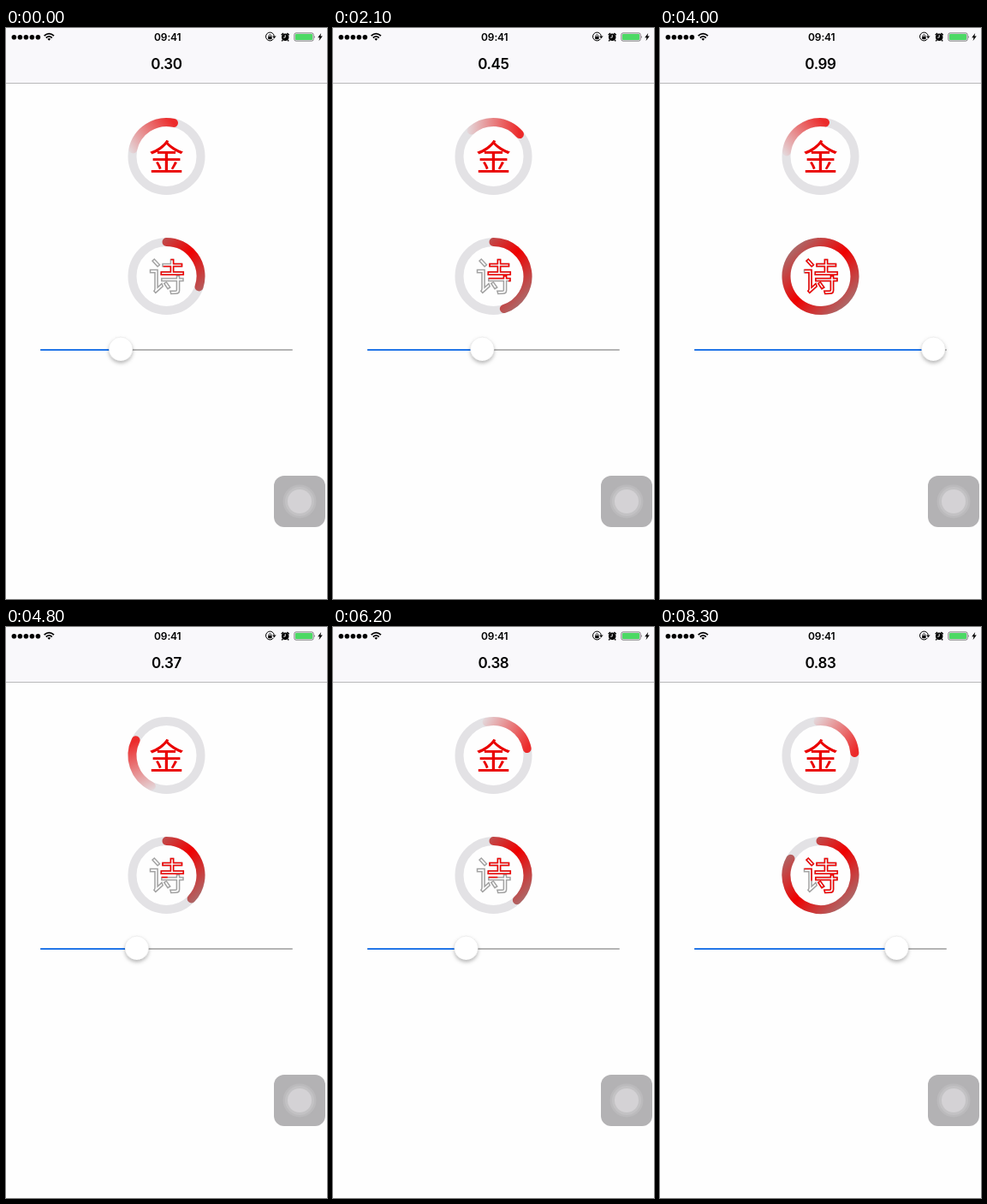
Write an HTML page that moves like this. It is 375 px wide and 667 px high and loops after 8400 ms.

```html
<!DOCTYPE html>
<html lang="zh">
<head>
<meta charset="utf-8">
<title>Progress rings</title>
<style>
  html, body { margin: 0; width: 100%; height: 100%; overflow: hidden; background: #fefefe; }
  svg { display: block; width: 375px; height: 667px; }
  .ui { font-family: Inter, Roboto, sans-serif; font-weight: 600; text-anchor: middle; }
  .glyph path { stroke-width: 1.5; stroke-linejoin: miter; }
</style>
</head>
<body>
<svg viewBox="0 0 375 667" fill="none">
  <defs>
    <linearGradient id="tail" gradientUnits="userSpaceOnUse" x1="146" y1="157" x2="187" y2="110">
      <stop offset="0" stop-color="#ec2a2a" stop-opacity="0.03"/>
      <stop offset="1" stop-color="#ec2a2a"/>
    </linearGradient>
    <linearGradient id="sheen" gradientUnits="userSpaceOnUse" x1="142.5" y1="245" x2="232.5" y2="335">
      <stop offset="0" stop-color="#929292"/>
      <stop offset=".5" stop-color="#f00000"/>
      <stop offset="1" stop-color="#929292"/>
    </linearGradient>
    <filter id="shade" x="-50%" y="-50%" width="200%" height="200%">
      <feDropShadow dx="0" dy="2.5" stdDeviation="2" flood-color="#000" flood-opacity=".28"/>
    </filter>
  </defs>

  <rect width="375" height="667" fill="#fefefe"/>
  <rect width="375" height="64" fill="#f9f8fb"/>
  <path d="M0 64.5H375" stroke="#b9b8ba"/>

  <!-- status bar -->
  <g id="dots" fill="#000"></g>
  <g stroke="#000" stroke-width="1.7">
    <path d="M44.6 9.2Q50.3 3.9 56 9.2M46.8 11.5Q50.3 8.3 53.8 11.5"/>
    <path d="M50.3 14.8L48.4 12.7Q50.3 11.2 52.2 12.7Z" fill="#000" stroke="none"/>
  </g>
  <text class="ui" x="188.8" y="14.8" font-size="12" letter-spacing="-.1" fill="#000">09:41</text>
  <g stroke="#000">
    <path d="M312.6 12.6A4.9 4.9 0 1 1 313.3 9.4"/>
    <path d="M311 9.4H315.6L313.3 12.2Z" fill="#000" stroke="none"/>
    <rect x="306.2" y="9.9" width="4.4" height="3.3" fill="#000" stroke="none"/>
    <path d="M307.1 10V9A1.3 1.3 0 0 1 309.7 9V10" stroke-width=".8"/>
  </g>
  <circle cx="326.2" cy="10.8" r="4.3" fill="#000"/>
  <path d="M321.7 8.2L324 6M330.7 8.2L328.4 6M323.3 14L322.2 15.4M329.1 14L330.2 15.4" stroke="#000" stroke-width="1.4"/>
  <path d="M326.2 8V11L324.2 11.2" stroke="#fff" stroke-width=".9"/>
  <rect x="336.9" y="5.9" width="22.2" height="9.2" rx="1.8" stroke="#555" stroke-width=".8"/>
  <rect x="338" y="7" width="20" height="7" rx=".8" fill="#4cd964"/>
  <path d="M360.1 8.8Q361.6 10.5 360.1 12.2Z" fill="#555"/>
  <path d="M368.2 6L364.2 11.2H366.5L365.6 15L369.8 9.6H367.4Z" fill="#000"/>

  <text id="title" class="ui" x="187.4" y="48.3" font-size="17" letter-spacing="-.4" fill="#000"></text>

  <!-- spinning ring -->
  <circle cx="187.5" cy="150" r="40" stroke="#e3e2e5" stroke-width="10"/>
  <path id="spin" d="M147.5 150A40 40 0 0 1 187.5 110" stroke="url(#tail)" stroke-width="10" stroke-linecap="round"/>
  <text x="187.5" y="166" font-size="41" fill="#ea0000" text-anchor="middle"
        font-family="'Noto Sans CJK SC', 'Noto Sans CJK', sans-serif">金</text>

  <!-- progress ring -->
  <circle cx="187.5" cy="290" r="40" stroke="#e3e2e5" stroke-width="10"/>
  <path id="arc" stroke="url(#sheen)" stroke-width="10" stroke-linecap="round"/>
  <g id="base" class="glyph" stroke="#a2a2a2"></g>
  <g id="ink" class="glyph" stroke="#f00000"></g>

  <!-- slider -->
  <path d="M41 376H334" stroke="#b4b4b4" stroke-width="2" stroke-linecap="round"/>
  <path id="fill" stroke="#2376e8" stroke-width="2" stroke-linecap="round"/>
  <circle id="thumb" cy="375" r="13.9" fill="#fff" stroke="#000" stroke-opacity=".12" stroke-width=".5" filter="url(#shade)"/>

  <!-- floating button -->
  <rect x="313" y="523" width="60" height="60" rx="12" fill="#b3b2b4"/>
  <circle cx="343" cy="553" r="19.5" fill="#bbbabc"/>
  <circle cx="343" cy="553" r="17" fill="#c3c2c4"/>
  <circle cx="343" cy="553" r="14" fill="#d4d2d5"/>
</svg>
<script>
const LOOP = 8400, STEP = 100;
const $ = id => document.getElementById(id);

function add(parent, tag, attrs) {
  const el = document.createElementNS('http://www.w3.org/2000/svg', tag);
  for (const k in attrs) el.setAttribute(k, attrs[k]);
  return parent.appendChild(el);
}

// [ms, value] keys, linear in between
const slide = [
  [0, .30], [950, .30], [1400, .13], [1600, .14], [1800, .22], [2100, .45],
  [2700, .67], [3600, .96], [3750, .99], [4100, .99], [4500, .58], [4800, .37],
  [5400, .07], [5600, .02], [5800, .06], [6200, .38], [6300, .45], [7100, .83], [LOOP, .83]
];
const turn = [
  [0, 12.3], [900, 337.3], [2100, 769.6], [4000, 1448],
  [4800, 1736.2], [6200, 2238.6], [8300, 2965.7]
];

function at(keys, t) {
  const i = keys.findIndex(k => k[0] > t);
  if (i < 0) return keys[keys.length - 1][1];
  const [t0, a] = keys[i - 1], [t1, b] = keys[i];
  return a + (b - a) * (t - t0) / (t1 - t0);
}

// outline of the character 诗, in drawing order
const contours = [
  'M192.4 270.5H195.6V275.5H205.5V278.6H195.6V285H207.3V288.2H181.3V285H192.4V278.6H183V275.5H192.4Z',
  'M181.8 292.4H199.4V289.8H202.6V292.4H207V295.6H202.6V306.5Q202.6 310.3 198.5 310.3L192.8 310.5L191.9 307.3H198Q199.4 307.3 199.4 306V295.6H181.8Z',
  'M184.8 298.4L187.4 296.9L191.8 303L189 304.7Z',
  'M171 272L173.3 270L179.5 276.6L177.1 278.8Z',
  'M168.5 282.6H177.1V303L182 298.6L183.2 301.7L174.8 309.4L172.9 307.2Q174 306 174 304.5V285.7H168.5Z'
];
let total = 0;
const strokes = contours.map(d => {
  add($('base'), 'path', { d });
  const el = add($('ink'), 'path', { d });
  const start = total, len = el.getTotalLength();
  total += len;
  return { el, start, len };
});

for (let i = 0; i < 5; i++) add($('dots'), 'circle', { cx: 9.4 + 7 * i, cy: 10.8, r: 2.8 });

function draw(t) {
  const v = at(slide, t);
  $('title').textContent = v.toFixed(2);
  $('spin').setAttribute('transform', `rotate(${at(turn, t)} 187.5 150)`);

  const a = v * 2 * Math.PI;
  const x = 187.5 + 40 * Math.sin(a), y = 290 - 40 * Math.cos(a);
  $('arc').setAttribute('d', `M187.5 250A40 40 0 ${v > .5 ? 1 : 0} 1 ${x} ${y}`);

  for (const { el, start, len } of strokes) {
    const shown = Math.min(len, Math.max(0, v * total - start));
    el.setAttribute('visibility', shown > 0 ? 'visible' : 'hidden');
    el.setAttribute('stroke-dasharray', shown < len ? `${shown} 999` : 'none');
  }

  const thumbX = 53.5 + 268.5 * v;
  $('fill').setAttribute('d', `M41 376H${thumbX}`);
  $('thumb').setAttribute('cx', thumbX);
}

const begin = performance.now();
function tick() {
  const t = (performance.now() - begin) % LOOP;
  draw(Math.floor(t / STEP) * STEP);
  requestAnimationFrame(tick);
}
tick();
</script>
</body>
</html>
```
